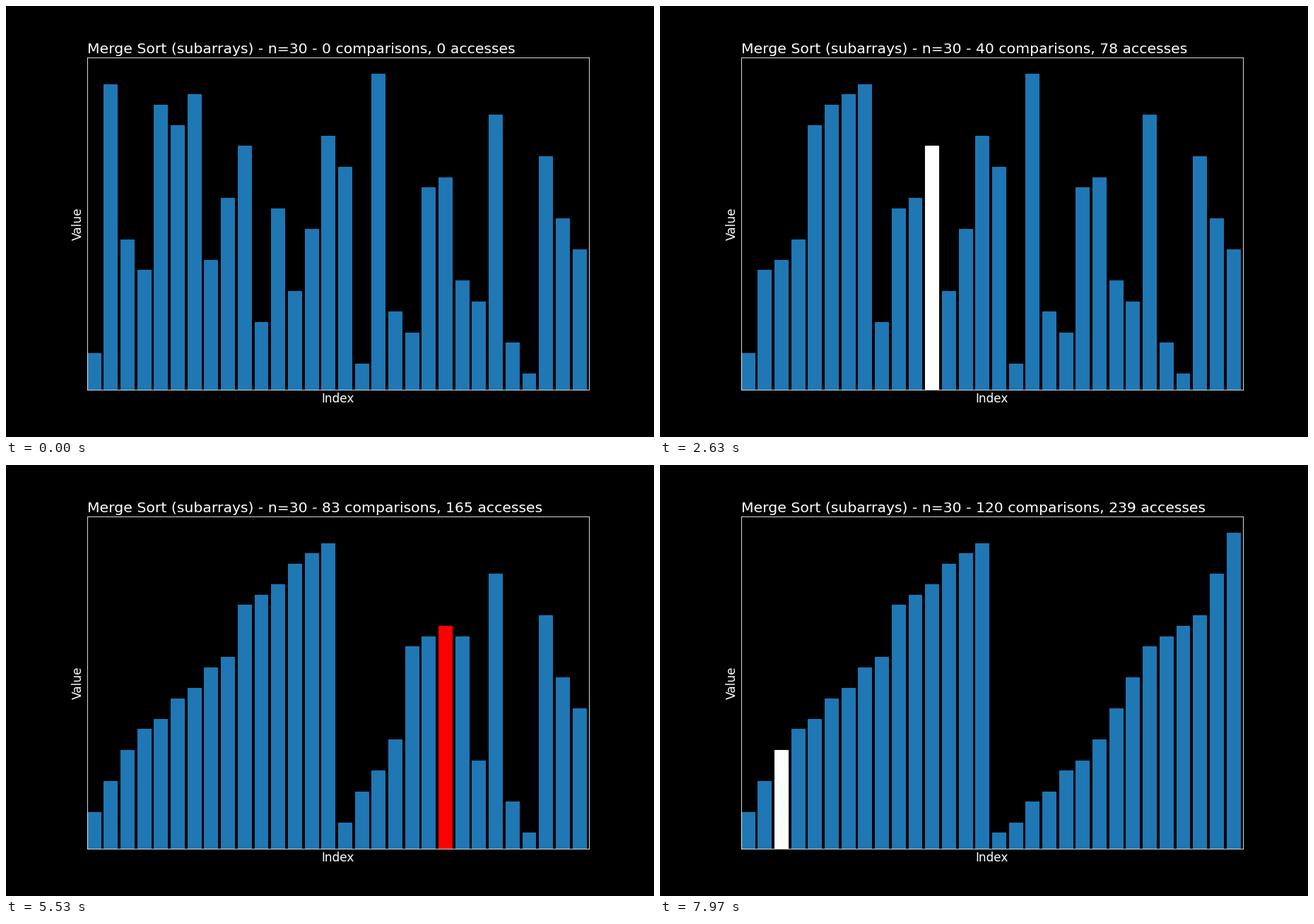
These frames come from a looping animation (917x611 px, 8 s). A matplotlib script:

```python
import matplotlib.pyplot as plt
import numpy as np
from matplotlib.animation import FuncAnimation

W, H, DPI = 917, 611, 64
SCALE = 76.4 / DPI          # a 12 x 8 inch layout shrunk to the stage
FRAMES, FPS = 240, 30
N = 30
BLUE = "#1f77b4"
HIGHLIGHT = {"get": "white", "set": "red"}

ORDER = [2, 28, 13, 10, 26, 24, 27, 11, 17, 22, 5, 16, 8, 14, 23,
         20, 1, 29, 6, 4, 18, 19, 9, 7, 25, 3, 0, 21, 15, 12]
START = np.round(np.linspace(50, 1000, N))[ORDER]


class TrackedArray:
    """Array that records its state after every read and write."""

    def __init__(self, values):
        self.values = values.copy()
        self.log = [(values.copy(), None, None, 0)]
        self.reads = 0

    def record(self, i, op):
        self.log.append((self.values.copy(), i, op, self.reads))

    def __getitem__(self, i):
        self.record(i, "get")
        self.reads += 1
        return self.values[i]

    def __setitem__(self, i, value):
        self.values[i] = value
        self.record(i, "set")


def merge(arr, lo, mid, hi):
    left = [arr[i] for i in range(lo, mid + 1)]
    right = [arr[i] for i in range(mid + 1, hi + 1)]
    for k in range(lo, hi + 1):
        take_left = left and (not right or left[0] <= right[0])
        arr[k] = (left if take_left else right).pop(0)


def merge_sort(arr, lo, hi):
    if lo < hi:
        mid = (lo + hi) // 2
        merge_sort(arr, lo, mid)
        merge_sort(arr, mid + 1, hi)
        merge(arr, lo, mid, hi)


tracked = TrackedArray(START)
merge_sort(tracked, 0, N - 1)

plt.style.use("dark_background")
plt.rcParams.update({"font.family": "DejaVu Sans", "font.size": 16 * SCALE,
                     "axes.linewidth": 0.8 * SCALE})

fig, ax = plt.subplots(figsize=(W / DPI, H / DPI), dpi=DPI)
fig.subplots_adjust(left=0.125, right=0.9, bottom=0.11, top=0.88)
bars = ax.bar(np.arange(N), START, width=0.8, align="edge",
              color=BLUE, edgecolor=BLUE, linewidth=SCALE)
ax.set(xlim=(0, N), ylim=(0, 1050), xticks=[], yticks=[])
ax.set_xlabel("Index", labelpad=4 * SCALE)
ax.set_ylabel("Value", labelpad=4 * SCALE)
title = ax.set_title("", loc="left", pad=6 * SCALE)


def update(frame):
    heights, active, op, comparisons = tracked.log[frame]
    for i, (bar, height) in enumerate(zip(bars, heights)):
        bar.set_height(height)
        bar.set_color(HIGHLIGHT[op] if i == active else BLUE)
    title.set_text(f"Merge Sort (subarrays) - n={N} - "
                   f"{comparisons} comparisons, {frame} accesses")
    return [*bars, title]


anim = FuncAnimation(fig, update, frames=FRAMES, interval=1000 / FPS,
                     repeat=True, repeat_delay=0, blit=False)
plt.show()
```
